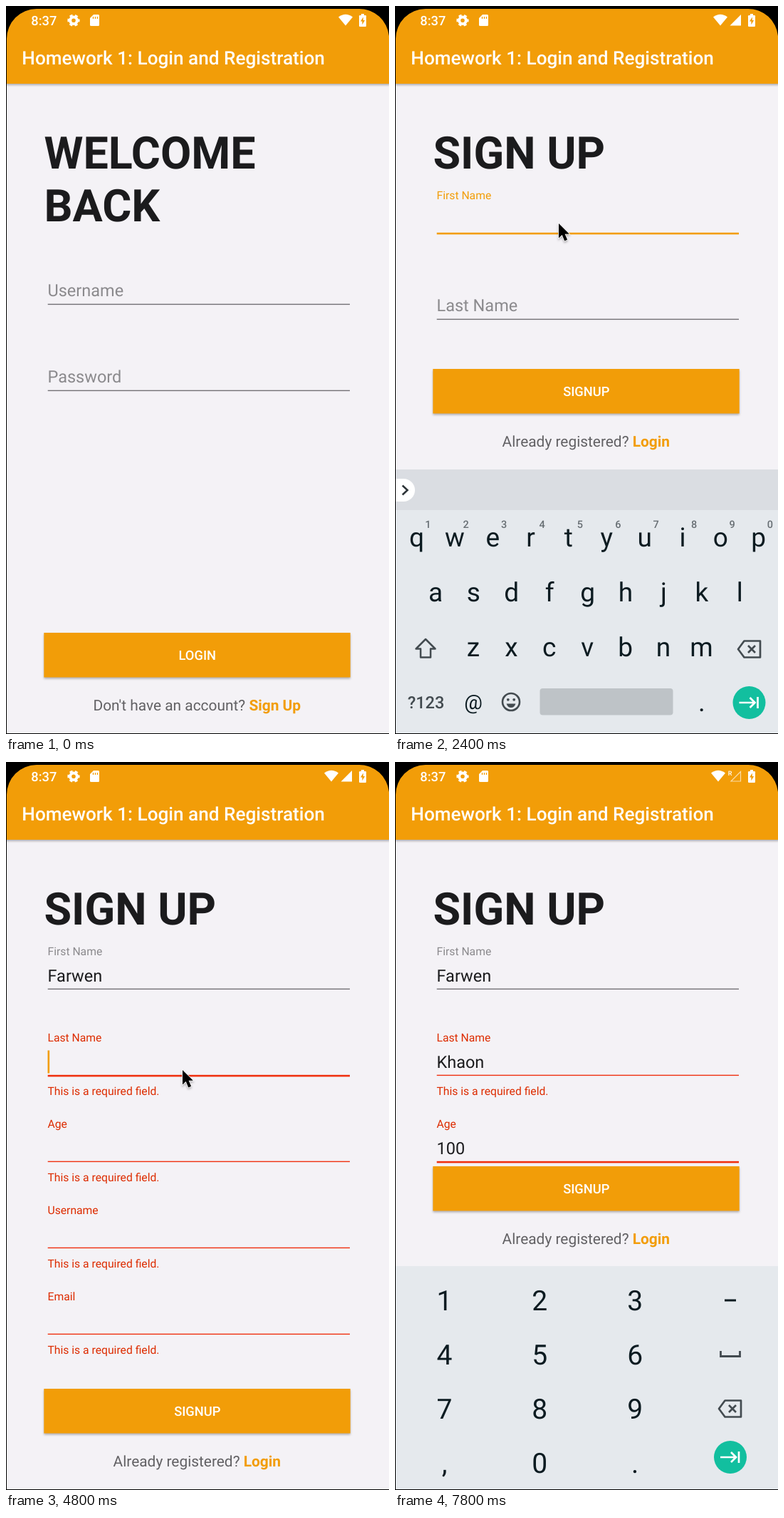
These frames come from a looping animation (538x1021 px, 8 s). An HTML page:

```html
<!DOCTYPE html>
<html lang="en">
<head>
<meta charset="utf-8">
<title>Login and Registration</title>
<style>
  html, body { margin: 0; width: 100%; height: 100%; overflow: hidden; background: #000; }
  svg { display: block; width: 100vw; height: 100vh; font-family: Roboto, sans-serif; text-rendering: geometricPrecision; }
  .mid { text-anchor: middle; }
  .med { font-weight: 500; }
  .bold { font-weight: 700; }
  .raised { filter: drop-shadow(0 2px 1.5px rgba(0, 0, 0, .28)); }
</style>
</head>
<body>
<svg id="stage" viewBox="0 0 538 1021"></svg>
<script>
const LOOP = 8000, TICK = 200;
const ORANGE = '#f29d08', PAPER = '#f4f2f6', INK = '#1b1b1d', HINT = '#8b8a8d', RED = '#dd2c00', KEY = '#0c1b21', ICON = '#434b50';
const FIELDS = ['First Name', 'Last Name', 'Age', 'Username', 'Email'];
const stage = document.getElementById('stage');

// Each entry changes the state from its time on.
const steps = [
  [0, { mouse: null, signup: 0, shift: 0, bar: 0, focus: -1, lift: 1, values: [], errors: false, caret: false, board: null, drop: 0, fade: 1, top: 879, signal: 0 }],
  [200, { mouse: [470, 700] }],
  [400, { mouse: [404, 905] }],
  [600, { mouse: [378, 973] }],
  [1000, { signup: .6, shift: 40 }],
  [1200, { signup: 1, shift: 0, bar: 1, mouse: [310, 690] }],
  [1400, { mouse: [235, 323] }],
  [1600, { mouse: [230, 305], bar: .4, focus: 0, lift: .6 }],
  [1800, { bar: 0, lift: 1, caret: true, board: 'abc', drop: 79, fade: .5 }],
  [2000, { drop: 0, fade: 1, top: 509, signal: 1 }],
  [2400, { caret: false }],
  [2600, { mouse: null, caret: true, values: ['F'] }],
  [2800, { values: ['Fa'] }],
  [3000, { values: ['Far'], signal: 0 }],
  [3200, { values: ['Farw'] }],
  [3400, { values: ['Farwe'] }],
  [3600, { values: ['Farwen'] }],
  [3800, { top: 879, drop: 79, fade: .06 }],
  [4000, { board: null, mouse: [300, 790] }],
  [4200, { mouse: [275, 890], caret: false }],
  [4400, { mouse: [268, 908], caret: true, signal: 1 }],
  [4600, { mouse: [256, 640], errors: true }],
  [4800, { mouse: [248, 432], focus: 1 }],
  [5000, { board: 'abc', drop: 79, fade: .5 }],
  [5200, { drop: 0, fade: 1, top: 509, mouse: null, values: ['Farwen', 'K'] }],
  [5400, { values: ['Farwen', 'Kha'], signal: 0 }],
  [5600, { values: ['Farwen', 'Khaon'] }],
  [5800, { drop: 79, fade: .05, mouse: [320, 600] }],
  [6000, { board: null, top: 879, mouse: [300, 684] }],
  [6200, { mouse: [190, 610], signal: 1 }],
  [6400, { mouse: [98, 545] }],
  [6800, { focus: 2, signal: 2 }],
  [7000, { board: 'num', drop: 79, fade: .5 }],
  [7200, { drop: 0, fade: 1, top: 567, mouse: null, values: ['Farwen', 'Khaon', '1'] }],
  [7400, { values: ['Farwen', 'Khaon', '10'] }],
  [7600, { values: ['Farwen', 'Khaon', '100'] }],
  [7800, { caret: false }]
];

const text = (x, y, size, fill, str, cls = '', more = '') =>
  `<text x="${x}" y="${y}" font-size="${size}" fill="${fill}" class="${cls}" ${more}>${str}</text>`;
const rect = (x, y, w, h, fill, more = '') =>
  `<rect x="${x}" y="${y}" width="${w}" height="${h}" fill="${fill}" ${more}/>`;
const path = (d, fill, more = '') => `<path d="${d}" fill="${fill}" ${more}/>`;
const line = (d, color, w, more = '') => path(d, 'none', `stroke="${color}" stroke-width="${w}" ${more}`);
const circle = (x, y, r, fill, more = '') => `<circle cx="${x}" cy="${y}" r="${r}" fill="${fill}" ${more}/>`;

function field(y, label, o = {}) {
  const { focus, value, error, lift = 0, caret } = o;
  const up = focus || value || error ? (focus ? lift : 1) : 0;
  const tone = error ? RED : focus ? ORANGE : HINT;
  const rule = error ? '#ef300f' : focus ? ORANGE : '#727175';
  const thick = focus ? 2.6 : 1.4;
  let out = text(58.5, y + 51 - 36.5 * up, 23.5 - 7.8 * up, tone, label);
  out += rect(58.7, y + 62.8 - thick / 2 + (focus ? .3 : -.4), 424.3, thick, rule);
  if (value) out += text(58.5, y + 52.3, 23.5, INK, value, '', focus ? 'id="typed"' : '');
  if (caret) out += rect(58.5, y + 27.5, 2.6, 32, ORANGE, 'id="caret"');
  if (error) out += text(58.5, y + 211 - (y > 0 ? 0 : 0) - 121 + 121 - 121 + .3, 15.7, RED, 'This is a required field.');
  return out;
}

function footer(top, label, ask, link) {
  return rect(53.3, top, 430.4, 62.5, ORANGE, 'class="raised"') +
    text(268.8, top + 38.2, 18.3, '#fff', label, 'mid med') +
    text(268.3, top + 109.3, 20.9, '#626164', `${ask} <tspan class="bold" fill="${ORANGE}">${link}</tspan>`, 'mid');
}

function loginPage() {
  return rect(0, 100, 540, 922, PAPER) +
    text(53.5, 228, 62.8, INK, 'WELCOME', 'bold') +
    text(53.5, 301.8, 62.8, INK, 'BACK', 'bold') +
    field(356, 'Username') + field(477, 'Password') +
    footer(879, 'LOGIN', "Don't have an account?", 'Sign Up');
}

function signupPage(s) {
  const fields = FIELDS.map((name, i) => field(256 + 121 * i, name, {
    focus: s.focus === i, value: s.values[i], lift: s.lift,
    error: s.errors && i > 0, caret: s.caret && s.focus === i
  })).join('');
  return `<g opacity="${s.signup}" transform="translate(0 ${s.shift})">` +
    rect(0, 100, 540, 922, PAPER) +
    text(53.5, 228, 62.8, INK, 'SIGN UP', 'bold') +
    `<clipPath id="view">${rect(0, 240, 540, s.top - 240, '#000')}</clipPath>` +
    `<g clip-path="url(#view)">${fields}${rect(483, 256, 5, 446, '#a4a3a6', `opacity="${s.bar}"`)}</g>` +
    footer(s.top, 'SIGNUP', 'Already registered?', 'Login') + '</g>';
}

function statusBar(signal) {
  const w = [467, 447, 444][signal];
  let out = text(35.3, 27, 18.3, '#fff', '8:37', 'med') +
    circle(95, 20.2, 4.8, 'none', 'stroke="#fff" stroke-width="4"') +
    circle(95, 20.2, 7.3, 'none', 'stroke="#fff" stroke-width="2.6" stroke-dasharray="4.2 3.445" stroke-dashoffset="2.1"') +
    path('M118 17l5-5h6.5q1.5 0 1.5 1.5v13q0 1.5-1.5 1.5h-10q-1.5 0-1.5-1.5z', '#fff') +
    line('M122.5 15v3M125.5 15v3M128.500 15v3', ORANGE, 1.3) +
    path(`M${w} 15.500q10-7.500 20 0l-10 12z`, '#fff') +
    rect(496, 13, 10, 16, '#fff', 'rx="1.3"') + rect(499, 11, 4, 3, '#fff') +
    path('M501.800 15.500l-3.800 6h2.400v4.800l3.700-6.200h-2.300z', ORANGE);
  if (signal === 1) out += path('M470.500 27.500h15.500v-15.500z', '#fff');
  if (signal === 2) out += line('M472 27h13.500v-13.500z', '#fbdca6', 1.2) + text(467.8, 18.500, 9, '#fff', 'R', 'med');
  return out;
}

function appBar(signal) {
  return rect(0, 0, 540, 109, ORANGE, 'class="raised"') + statusBar(signal) +
    text(22.3, 82.3, 26.15, '#fff', 'Homework 1: Login and Registration', 'med');
}

const backspace = (x, y) =>
  line(`M${x - 16} ${y}l8.500-11.500h22.500v23h-22.500z`, ICON, 2.7, 'stroke-linejoin="round"') +
  line(`M${x - 2} ${y - 5}l10 10m0-10l-10 10`, ICON, 2.7);
const enter = (x, y) => circle(x, y, 23, '#12bf9f') +
  line(`M${x - 14} ${y}h22m-7-7l7 7l-7 7M${x + 12} ${y - 8}v16`, '#fff', 2.7);
const keys = (str, x, y, gap, size = 37) =>
  [...str].map((c, i) => text(x + gap * i, y, size, KEY, c, 'mid')).join('');

function letterBoard() {
  const hints = [...'1234567890'].map((c, i) => text(46.3 + 53.4 * i, 731.5, 14.5, '#676e73', c, 'mid med')).join('');
  return rect(0, 650, 540, 58, '#dadde2') + rect(0, 707, 540, 400, '#e5e9ed') +
    rect(-12, 663, 40, 32, '#fff', 'rx="16"') + line('M10.500 672.500l7 6.500l-7 6.500', '#2c3337', 2.5) +
    hints + keys('qwertyuiop', 30.5, 757.5, 53.35) +
    keys('asdfghjkl', 57, 835, 53.4) + keys('zxcvbnm', 110, 912, 53.4) +
    line('M43 888l-13.500 13.500h6.500v12h14v-12h6.500z', ICON, 2.5, 'stroke-linejoin="round"') +
    backspace(498, 902) +
    text(43.5, 984.5, 23.5, ICON, '?123', 'mid med') + text(110, 986, 28.5, KEY, '@', 'mid') +
    circle(163, 976, 12, 'none', `stroke="${ICON}" stroke-width="2.6"`) +
    circle(158.8, 972.8, 1.9, ICON) + circle(167.2, 972.8, 1.9, ICON) +
    path('M156.500 978.500h13q-2 5.500-6.500 5.500t-6.500-5.500z', ICON) +
    rect(203.5, 957, 187, 37.5, '#bec3c7', 'rx="4"') +
    text(431, 989, 37, KEY, '.', 'mid') + enter(497.5, 977);
}

function numberBoard() {
  return rect(0, 707, 540, 400, '#e5e9ed') +
    ['123', '456', '789', ',0.'].map((r, i) => keys(r, 69.5, 769 + 76 * i, 133.8, 39)).join('') +
    line('M463 755h16', KEY, 3) + line('M457.500 826v7.500h27v-7.500', ICON, 2.8) +
    backspace(471, 907) + enter(471, 975);
}

function pointer([x, y]) {
  return path(`M${x} ${y}v20.500l4.700-4.400l3.500 8.300l3.900-1.700l-3.500-8h6.200z`, '#000',
    'stroke="#fff" stroke-width="1.5" paint-order="stroke" class="raised"');
}

function draw(s) {
  const board = s.board
    ? `<g opacity="${s.fade}" transform="translate(0 ${s.drop})" class="board">${s.board === 'abc' ? letterBoard() : numberBoard()}</g>` : '';
  stage.innerHTML =
    `<clipPath id="screen">${path('M1 1020V46A42 42 0 0 1 43 4H496A42 42 0 0 1 538 42V1020z', '#000')}</clipPath>` +
    `<g clip-path="url(#screen)">${s.signup < 1 ? loginPage() : ''}${s.signup ? signupPage(s) : ''}` +
    `${appBar(s.signal)}${board}${s.mouse ? pointer(s.mouse) : ''}</g>`;
  const typed = document.getElementById('typed'), caret = document.getElementById('caret');
  if (typed && caret) caret.setAttribute('x', 58 + typed.getComputedTextLength());
}

const stateAt = t => Object.assign({}, ...steps.filter(([at]) => at <= t).map(([, change]) => change));
const start = performance.now();
let shown = -1;
function frame() {
  const tick = Math.floor((performance.now() - start) % LOOP / TICK);
  if (tick !== shown) draw(stateAt((shown = tick) * TICK));
  requestAnimationFrame(frame);
}
frame();
</script>
</body>
</html>
```
